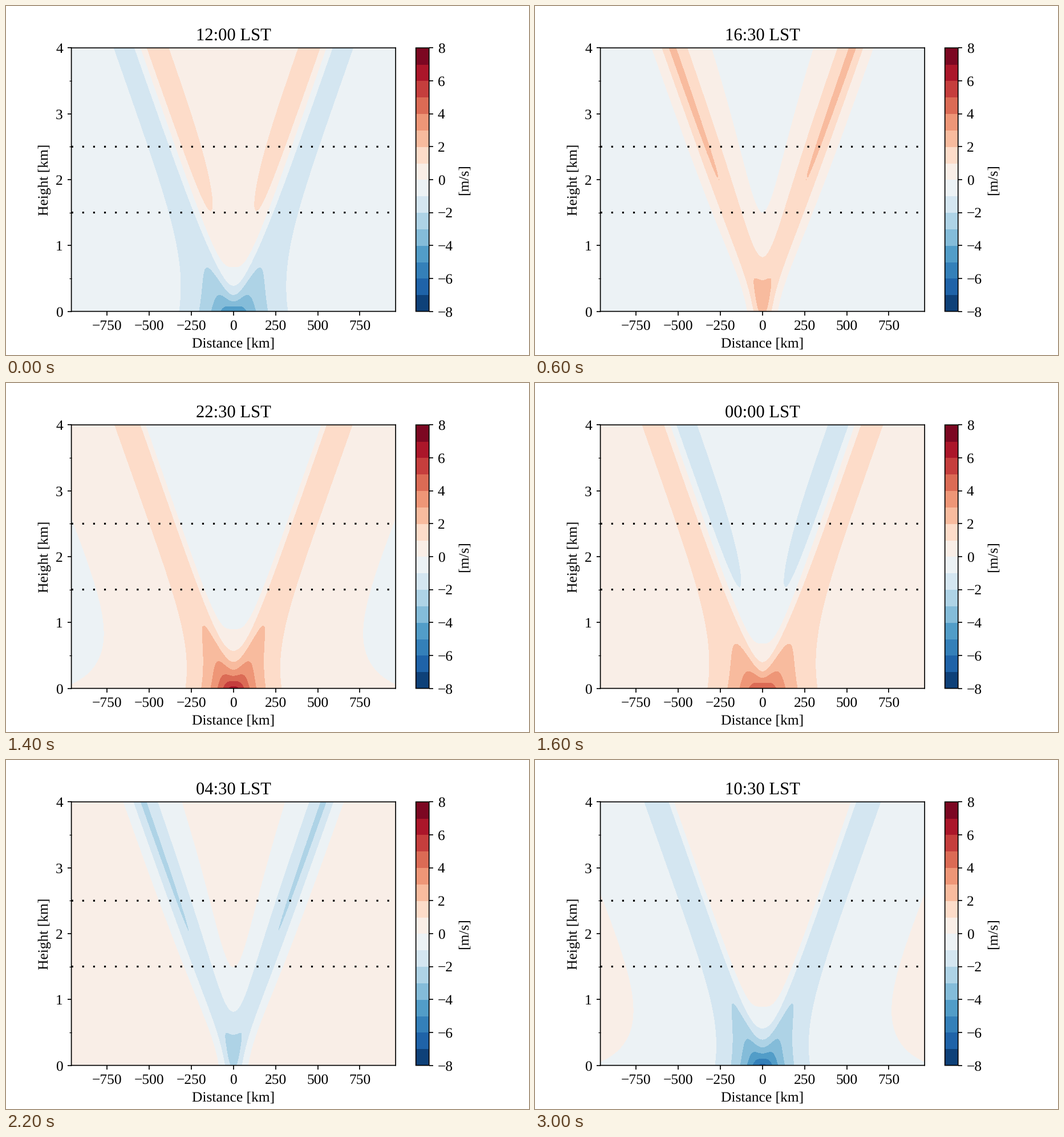
A matplotlib script that plays this animation: 917x611 px, repeating every 3200 ms.

```python
import numpy as np
import matplotlib.pyplot as plt
from matplotlib.animation import FuncAnimation
from matplotlib.ticker import MultipleLocator

W, H, DPI = 917, 611, 72
PT = W / (6 * 72)        # pixels per point of a six inch wide figure
FRAMES, STEP_MS = 16, 200

plt.rcParams.update({
    "font.family": "Liberation Serif",
    "font.size": 12 * PT,
    "text.hinting": "none",
    "path.snap": False,
    "axes.titlesize": 14.4 * PT,
    "axes.titlepad": 6 * PT,
    "axes.labelpad": 4 * PT,
    "axes.linewidth": 0.8 * PT,
})
for axis in ("xtick", "ytick"):
    plt.rcParams.update({
        f"{axis}.major.size": 3.5 * PT,
        f"{axis}.major.width": 0.8 * PT,
        f"{axis}.major.pad": 3.5 * PT,
        f"{axis}.minor.size": 2 * PT,
        f"{axis}.minor.width": 0.6 * PT,
    })

# Linear sea breeze at the equator: heating decays with height z0 and is
# spread over x0 around the coast; waves radiate upward along N/omega rays.
OMEGA = 2 * np.pi / 86400
N = 0.01
Z0, X0 = 1.0, 50.0                    # km
Q0 = 1.2e-5                           # m s-3
L = N * Z0 / OMEGA                    # horizontal scale, km
U = Q0 / (np.pi * N * OMEGA)          # m/s

x = np.linspace(-7, 7, 201)
z = np.linspace(0, 4, 101)
dk = 0.02
k = np.arange(dk / 2, 50, dk)
weight = np.exp(-k * X0 / L) / (1 + k**2) * dk
cos_kx = np.cos(np.outer(k, x))


def wind(phase):
    """Cross-coast wind (m/s) on the z-x grid at a phase of the day."""
    decay = np.exp(-z)[:, None] * np.cos(phase)
    wave = k * np.sin(np.outer(z, k) + phase)
    return -U * ((decay - wave) * weight) @ cos_kx


fields = [wind(2 * np.pi * i / FRAMES) for i in range(FRAMES)]
levels = np.arange(-8, 9)

fig, ax = plt.subplots(figsize=(W / DPI, H / DPI), dpi=DPI)
fig.subplots_adjust(left=0.125, right=0.9, bottom=0.125, top=0.88)


def fill(i):
    return ax.contourf(x * L, z * Z0, fields[i], levels, cmap="RdBu_r")


contours = fill(0)
bar = fig.colorbar(contours, ax=ax, ticks=MultipleLocator(2))
bar.set_label("[m/s]")

for height in (1.5, 2.5):
    ax.axhline(height, color="black", lw=1.5 * PT, ls=(0, (1, 5)))
ax.set(xlim=(-7 * L, 7 * L), ylim=(0, 4),
       xlabel="Distance [km]", ylabel="Height [km]")
ax.xaxis.set_major_locator(MultipleLocator(250))
ax.yaxis.set_major_locator(MultipleLocator(1))
ax.yaxis.set_minor_locator(MultipleLocator(0.5))
title = ax.set_title("")


def update(i):
    global contours
    contours.remove()
    contours = fill(i)
    minutes = (12 * 60 + 90 * i) % 1440
    title.set_text(f"{minutes // 60:02d}:{minutes % 60:02d} LST")
    return contours, title


anim = FuncAnimation(fig, update, frames=FRAMES, interval=STEP_MS,
                     repeat=True, repeat_delay=0, blit=False)
plt.show()
```
